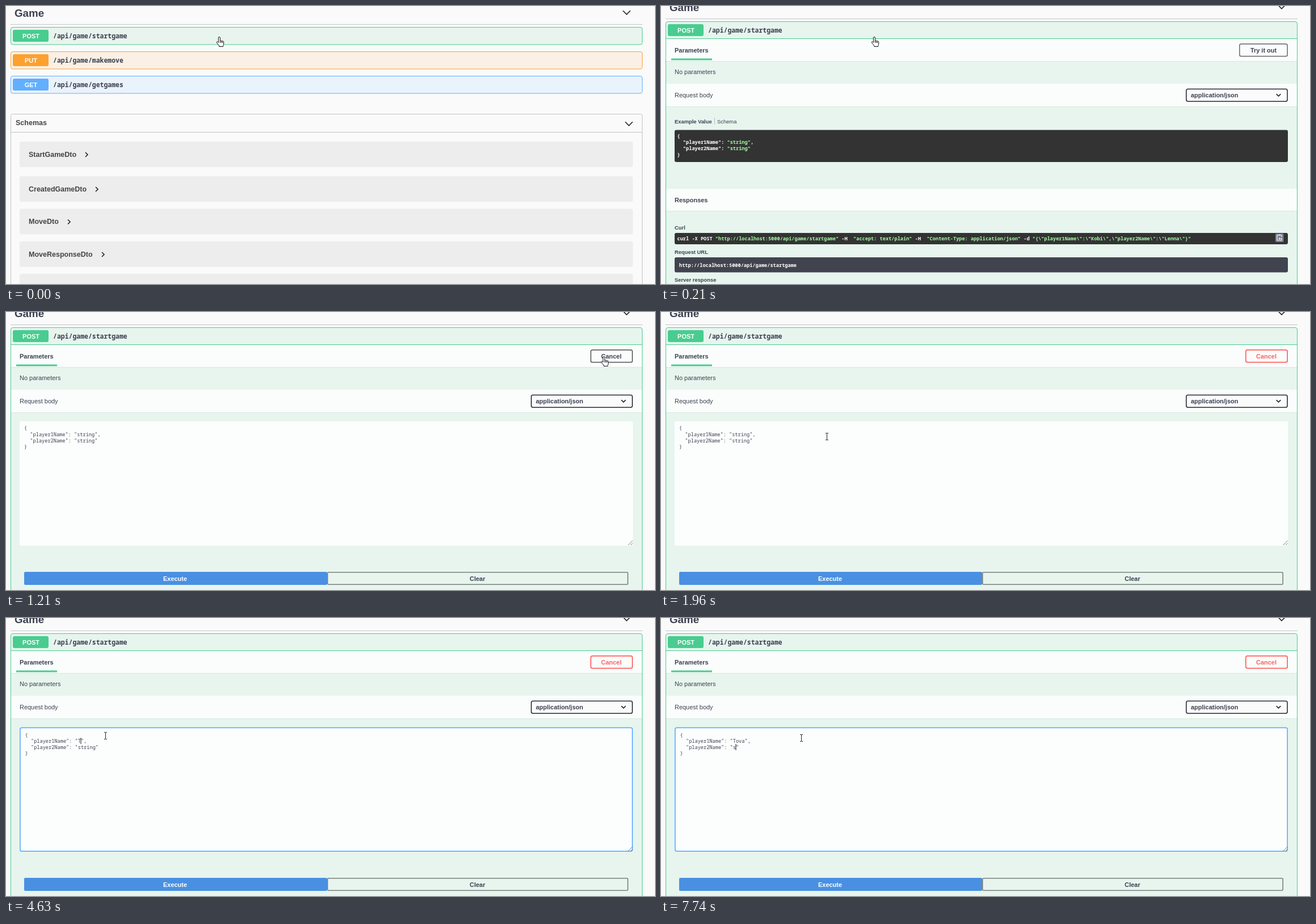
Recreate the animation shown at these times as an HTML page. Size 1144 px wide and 490 px high, loop 8 s.

```html
<!DOCTYPE html>
<html lang="en">
<head>
<meta charset="utf-8">
<title>API explorer</title>
<style>
  html, body { margin: 0; width: 100%; height: 100%; overflow: hidden; background: #fafafa; }
  svg { display: block; }
  text { font: 10.96px "Liberation Sans", Arial, sans-serif; fill: #3b4151; white-space: pre; }
  .b { font-weight: 700; }
  .small { font-size: 9.4px; }
  .mid { font-size: 12.5px; fill: #444; }
  .big { font-size: 18.8px; }
  .white { fill: #fff; }
  .path, .code { font-family: "Noto Sans Mono", "DejaVu Sans Mono", monospace; }
  .path { font-size: 11.48px; }
  .code { font-size: 8.63px; }
  .str { fill: #a2fca2; }
  .c { text-anchor: middle; }
  .line { fill: none; stroke: #222; stroke-width: 1.6; }
</style>
</head>
<body>
<svg id="stage" width="1144" height="490" viewBox="0 0 1144 490"></svg>
<script>
const LOOP = 8000, STEP = 70, ADVANCE = 5.178, LINE = 10.9;
const GREEN = '#49cc90', ORANGE = '#fca130', BLUE = '#61affe';
const MINT = '#e7f5ee', PALE = '#fafdfc', DARK = '#333';

// Markup helpers
const rect = (x, y, x2, y2, fill, r = 0, extra = '') =>
  `<rect x="${x}" y="${y}" width="${x2 - x}" height="${y2 - y}" rx="${r}" fill="${fill}" ${extra}/>`;
const frame = (x, y, x2, y2, fill, stroke, w, r = 3, extra = '') =>
  rect(x + w / 2, y + w / 2, x2 - w / 2, y2 - w / 2, fill, r, `stroke="${stroke}" stroke-width="${w}" ${extra}`);
const text = (x, y, str, cls = '', extra = '') => `<text x="${x}" y="${y}" class="${cls}" ${extra}>${str}</text>`;
const path = (d, extra = '') => `<path d="${d}" class="line" ${extra}/>`;
const chevron = (x, y, s) => path(`M${x - s} ${y - s / 2}l${s} ${s}l${s} ${-s}`);
const group = (id, body) => `<g id="${id}">${body}</g>`;

// Quoted values are coloured, keys (followed by a colon) are not
const code = (x, y, str) => text(x, y, str.replace(/("(?:\\.|[^"\\])*")(:?)/g,
  (all, value, colon) => colon ? all : `<tspan class="str">${value}</tspan>`), 'code b white');

const json = (a, b) => ['{', `  "player1Name": "${a}",`, `  "player2Name": "${b}"`, '}'];

const title = dy => text(15, 18.5 + dy, 'Game', 'b big') + chevron(1094, 11.5 + dy, 6.5)
  + rect(8, 32 + dy, 1122, 33 + dy, '#c3c5ca');

const summary = (y, method, route, color) =>
  rect(12, y + 5, 75, y + 26, color, 3) + text(44, y + 19.5, method, 'b c white')
  + text(83, y + 19.5, route, 'path b');

const operation = (y, method, route, color, tint) =>
  frame(8, y, 1122, y + 31.5, tint, color, 1, 3.5) + summary(y, method, route, color);

const model = (y, name, arrowX) => rect(24, y, 1105, y + 45, '#ededed', 3)
  + text(40, y + 26.5, name, 'b mid')
  + path(`M${arrowX} ${y + 19}l4 4l-4 4`);

const section = (y, y2) => rect(9, y, 1121, y2 + 1, '#d9e6e0') + rect(9, y, 1121, y2, PALE);

const list = title(0)
  + operation(37, 'POST', '/api/game/startgame', GREEN, '#e8f4ed')
  + operation(80, 'PUT', '/api/game/makemove', ORANGE, '#faf0e5')
  + operation(123, 'GET', '/api/game/getgames', BLUE, '#eaf2fb')
  + frame(8, 190, 1122, 520, 'none', '#c0c2c7', 1)
  + rect(8, 222, 1122, 223, '#c0c2c7')
  + text(17, 210, 'Schemas', 'b mid') + chevron(1098, 207.5, 6.5)
  + model(239, 'StartGameDto', 140) + model(300, 'CreatedGameDto', 158)
  + model(357.5, 'MoveDto', 109) + model(415, 'MoveResponseDto', 169)
  + model(472, 'PlayerDto', 115);

const opened = title(-10)
  + frame(8, 27, 1122, 520, MINT, GREEN, 1, 3.5)
  + summary(27, 'POST', '/api/game/startgame', GREEN)
  + rect(8, 57, 1122, 58, GREEN)
  + section(58, 97) + text(24, 82, 'Parameters', 'b') + rect(18, 92.5, 90, 95.5, GREEN)
  + text(24, 119.5, 'No parameters')
  + section(137, 177) + text(24, 161, 'Request body')
  + frame(925, 145.5, 1105, 169, '#fbfbfb', '#41444e', 1.8)
  + text(934, 161, 'application/json', 'b') + chevron(1088.5, 157, 3.8);

const command = 'curl -X POST "http://localhost:5000/api/game/startgame" -H  "accept: text/plain" '
  + '-H  "Content-Type: application/json" -d "{\\"player1Name\\":\\"Kobi\\",\\"player2Name\\":\\"Lenna\\"}"';

const details = frame(1019, 66, 1105, 89.5, 'none', '#777', 1.7) + text(1062, 82, 'Try it out', 'b c')
  + text(24, 206.5, 'Example Value', 'b small') + rect(94, 197, 95, 209, '#b5bdba')
  + text(99, 206.5, 'Schema', 'small')
  + rect(24, 218.5, 1105, 275, DARK, 3)
  + json('string', 'string').map((s, i) => code(28.5, 232 + i * LINE, s)).join('')
  + section(322, 361) + text(24, 345.5, 'Responses', 'b')
  + text(24, 393.5, 'Curl', 'b small')
  + rect(24, 400, 1105, 420, DARK, 3) + code(28.5, 413, command)
  + rect(1083, 401, 1097.5, 416, '#7d8293', 2)
  + path('M1089 413h-3v-9h8v3M1088 403.5h4M1094 409v4h-4.500M1094 410h-5l2-2m-2 2l2 2',
    'style="stroke:#fff;stroke-width:1"')
  + text(24, 437, 'Request URL', 'b small')
  + rect(24, 443, 1105, 469.5, '#41444e', 3)
  + text(32, 459.5, 'http://localhost:5000/api/game/startgame', 'code b white')
  + text(24, 486, 'Server response', 'b small');

const editor = frame(1030, 66, 1105, 89.5, 'none', '#777', 1.7, 3, 'id="cancelBox"')
  + text(1067, 82, 'Cancel', 'b c', 'id="cancelText"')
  + rect(24, 192.5, 1105, 412, '#fcfefd', 3)
  + frame(24, 192.5, 1105, 412, 'none', BLUE, 1.7, 3, 'id="focusRing"')
  + path('M1096.500 411l8-8M1101 411l3.500-3.500', 'style="stroke:#777;stroke-width:1"')
  + group('body', [0, 1, 2, 3].map(i => text(32, 208 + i * LINE, '', 'code')).join('')
    + rect(0, 0, 1, 11, '#111', 0, 'id="caret"'))
  + rect(32, 458, 566, 481, '#4990e2', 2) + text(298, 473.5, 'Execute', 'b c white')
  + frame(566, 458, 1097, 481, 'none', '#7a807e', 1.6, 2) + text(831, 473.5, 'Clear', 'b c');

const outline = 'style="fill:#fff;stroke:#111;stroke-width:1"';
const pointers =
  path('M-1.6 9.500V1a1.500 1.500 0 0 1 3 0V6.200q1.300-.9 2.200.3 1.200-.7 2 .4 2-.3 2.100 1.600V12q-.2 1.500-1 2.600V16.500H-.2V15Q-2 13-4.500 9.700q-.6-1.800 1-1.900 1 .1 1.900 1.700zM1.400 6v4M3.600 7v3M5.600 7.500v2.500', outline + ' id="hand"')
  + path('M0 0v15l3.500-3.300 2.400 5.300 2.200-1-2.400-5.200h4.800z', outline + ' id="arrow"')
  + path('M-2.500-5.500h2l.5.5.5-.5h2M0-5v11M-2.500 6.500h2l.5-.5.5.5h2', 'id="beam" style="stroke-width:1"');

const stage = document.getElementById('stage');
stage.innerHTML = group('list', list) + group('opened', opened + group('details', details) + group('editor', editor))
  + '<circle id="halo" r="11.5" fill="#f5ea38"/>' + group('pointer', pointers);
const el = Object.fromEntries([...stage.querySelectorAll('[id]')].map(n => [n.id, n]));
const lines = el.body.querySelectorAll('text');
const show = (node, on) => node.setAttribute('visibility', on ? 'inherit' : 'hidden');

// Pointer stops: time, x, y
const stops = [
  [280, 376, 55], [980, 1056, 79], [1120, 1056, 79], [1190, 1054, 79], [1820, 340, 220], [2240, 154, 217],
  [2380, 154, 217], [2660, 175, 207], [5320, 175, 207], [5530, 173, 203], [5810, 173, 203],
  [6090, 174, 232], [6370, 174, 232], [6650, 247, 211],
];
const clicks = [[70, 210], [1080, 1210], [2240, 2380], [6160, 6360]];

// Editing: time, first name, second name, caret line, caret column (end of the name by default, -1 hidden)
const edits = [
  [0, 'string', 'string', 1, -1], [2300, 'string', 'string', 1, 5], [2900, 'string', 'string', 1, -1],
  [3160, 'string', 'string', 1], [3430, 'strin', 'string', 1], [3630, 'stri', 'string', 1],
  [3710, 'str', 'string', 1], [3790, 'st', 'string', 1], [3950, 's', 'string', 1], [4160, '', 'string', 1],
  [4630, 'T', 'string', 1], [4830, 'To', 'string', 1], [5030, 'Tov', 'string', 1], [5360, 'Tova', 'string', 1],
  [6360, 'Tova', 'string', 2, 7], [6690, 'Tova', 'string', 2], [6950, 'Tova', 'strin', 2],
  [7210, 'Tova', 'stri', 2], [7410, 'Tova', 'str', 2], [7540, 'Tova', 'st', 2], [7740, 'Tova', 's', 2],
];

function pointerAt(t) {
  t = Math.floor(t / STEP) * STEP;
  const i = stops.findIndex(s => s[0] > t);
  if (i === 0) return stops[0].slice(1);
  if (i < 0) return stops[stops.length - 1].slice(1);
  const [a, b] = [stops[i - 1], stops[i]];
  const p = (t - a[0]) / (b[0] - a[0]), e = p * p * (3 - 2 * p);
  return [1, 2].map(k => Math.round(a[k] + (b[k] - a[k]) * e));
}

function drawPointer(t, editing) {
  const [x, y] = pointerAt(t);
  const onButton = x > (editing ? 1030 : 1019) && y > 65 && y < 90;
  const shape = y < 58 || onButton ? 'hand' : editing && y > 192 ? 'beam' : 'arrow';
  for (const name of ['hand', 'arrow', 'beam']) show(el[name], name === shape);
  el.pointer.setAttribute('transform', `translate(${x + (shape === 'beam' ? .5 : 0)} ${y})`);

  const click = clicks.find(([from, to]) => t >= from && t < to);
  show(el.halo, click);
  if (click) {
    el.halo.setAttribute('transform', `translate(${x} ${y - 1})`);
    el.halo.setAttribute('opacity', .85 - .25 * (t - click[0]) / (click[1] - click[0]));
  }
}

function drawEditor(t) {
  const [, first, second, row, col = (row === 1 ? first : second).length] = edits.findLast(e => e[0] <= t);
  const focused = t >= 2300;
  json(first, second).forEach((s, i) => { lines[i].textContent = s; });
  show(el.focusRing, focused);
  el.body.setAttribute('transform', focused ? 'translate(1.6 1.6)' : '');
  show(el.caret, col >= 0);
  el.caret.setAttribute('x', Math.round(33.6 + (18 + col) * ADVANCE) - 2.1);
  el.caret.setAttribute('y', 198.4 + row * 11);

  const p = Math.min(1, Math.max(0, (t - 1210) / 300));
  const mix = (from, to) => `rgb(${from.map((v, i) => Math.round(v + (to[i] - v) * p))})`;
  el.cancelBox.setAttribute('stroke', mix([100, 100, 100], [255, 96, 96]));
  el.cancelText.style.fill = mix([59, 65, 81], [255, 96, 96]);
}

function render(now) {
  const t = now % LOOP, editing = t >= 1210;
  show(el.list, t < 210);
  show(el.opened, t >= 210);
  show(el.details, t >= 210 && !editing);
  show(el.editor, editing);
  if (editing) drawEditor(t);
  else for (const node of [el.caret, el.focusRing]) show(node, false);
  drawPointer(t, editing);
  requestAnimationFrame(() => render(performance.now()));
}
render(performance.now());
</script>
</body>
</html>
```
